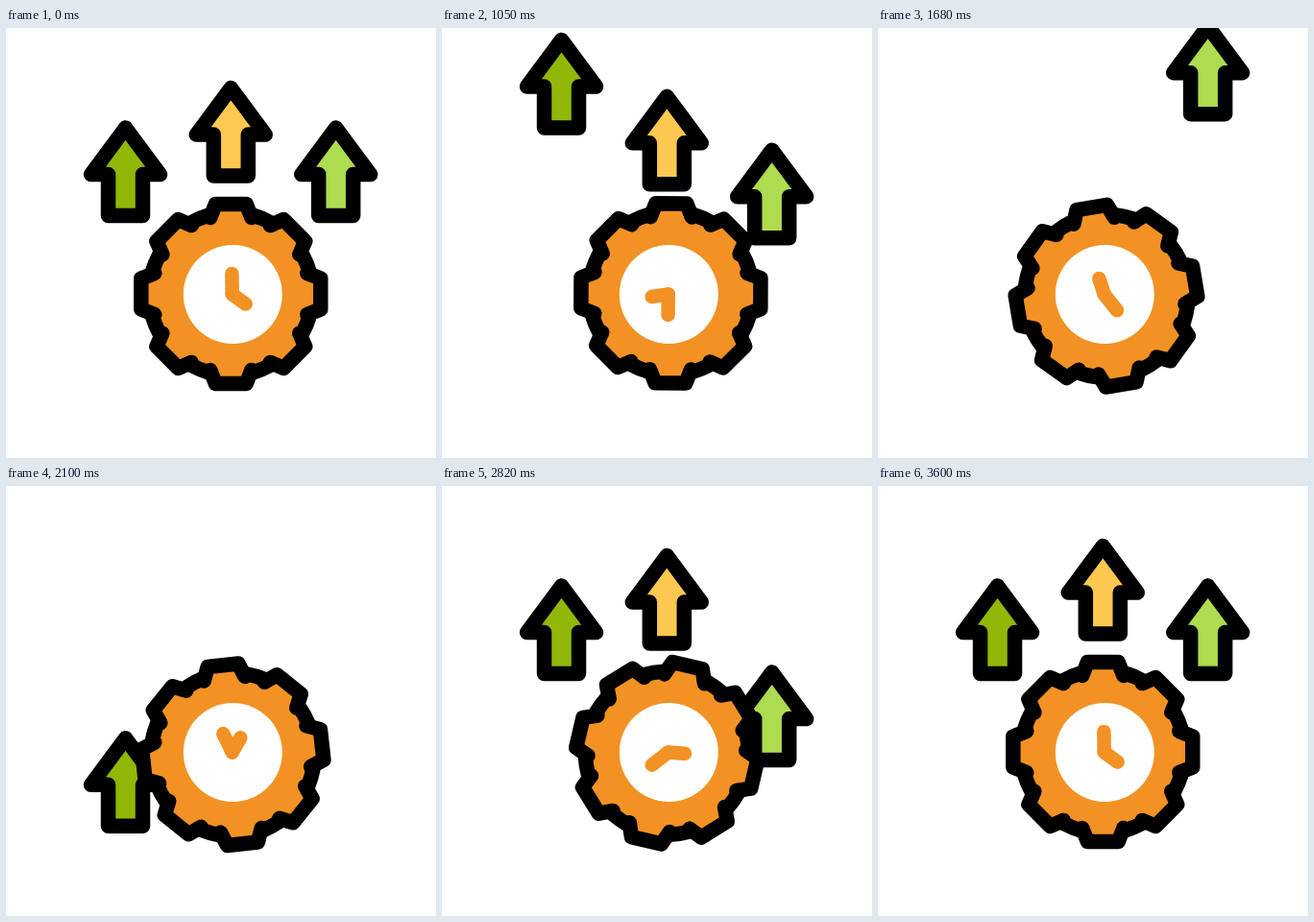
An HTML page with a canvas for the animation above (3.63 s loop, 448 by 448 pixels).

```html
<!DOCTYPE html>
<html>
<head>
<meta charset="utf-8">
<style>
  html, body { margin: 0; height: 100%; overflow: hidden; background: #fff; }
  canvas { display: block; }
</style>
</head>
<body>
<canvas id="stage" width="448" height="448"></canvas>
<script>
const ctx = document.getElementById('stage').getContext('2d');
const TAU = Math.PI * 2, STEP = 30, STEPS = 121;
const ORANGE = '#f29224';
ctx.lineCap = ctx.lineJoin = 'round';

// Each arrow dips, shoots off the top and glides back from below.
const arrows = [
  { x: 124.5, y: 152.5, color: '#91b708', delay: 0, end: 92.5, power: 2.9, gain: 0.01903 },
  { x: 234.3, y: 111, color: '#ffc850', delay: 10, end: 94, power: 3.36, gain: 0.00437 },
  { x: 343.7, y: 152.5, color: '#aedb50', delay: 20, end: 92.5, power: 2.9, gain: 0.01903 }
];

const clamp = v => Math.min(1, Math.max(0, v));
const smooth = v => v * v * (3 - 2 * v);

function arrowOffset(a, step) {
  const k = step - a.delay;
  if (k > 50) return a.gain * Math.max(0, a.end - k) ** a.power;
  return 25 * smooth(clamp(k / 18)) - 0.89 * Math.max(0, k - 20) ** 1.8;
}

// Fraction of the full turn: quick start, soft landing.
function turn(step) {
  const x = step / (STEPS - 1), r = 1 - x;
  return 3 * r * r * x * 0.4 + 3 * r * x * x * 0.97 + x ** 3;
}

function outline(path, fill) {
  ctx.fillStyle = fill;
  ctx.strokeStyle = '#000';
  ctx.lineWidth = 15.5;
  ctx.fill(path);
  ctx.stroke(path);
}

const arrowPath = new Path2D('M0-48.5L36 0H18V43H-18V0H-36Z');

const gearPath = new Path2D();
for (let i = 0; i < 8; i++) {
  const at = (x, y) => {
    const c = Math.cos(i * TAU / 8), s = Math.sin(i * TAU / 8);
    gearPath.lineTo(x * c - y * s, x * s + y * c);
  };
  at(-21.5, -79.5);
  at(-16, -93.5);
  at(16, -93.5);
  at(21.5, -79.5);
  const base = 0.29, start = i * TAU / 8 - TAU / 4;
  gearPath.arc(0, 0, 85, start + base, start + TAU / 8 - base);
}
gearPath.closePath();

function rotated(x, y, angle, draw) {
  ctx.save();
  ctx.translate(x, y);
  ctx.rotate(angle);
  draw();
  ctx.restore();
}

function hand(x, y, angle) {
  rotated(235.7, 277.4, angle, () => {
    ctx.strokeStyle = ORANGE;
    ctx.lineWidth = 14.5;
    ctx.beginPath();
    ctx.moveTo(0, 0);
    ctx.lineTo(x, y);
    ctx.stroke();
  });
}

function draw(step) {
  ctx.fillStyle = '#fff';
  ctx.fillRect(0, 0, 448, 448);
  for (const a of arrows)
    rotated(a.x, a.y + arrowOffset(a, step), 0, () => outline(arrowPath, a.color));

  const angle = turn(step) * TAU;
  rotated(236.5, 277.5, angle, () => {
    ctx.translate(-2.2, -0.5);
    outline(gearPath, ORANGE);
  });
  ctx.fillStyle = '#fff';
  ctx.beginPath();
  ctx.arc(236.3, 277.5, 51.5, 0, TAU);
  ctx.fill();
  hand(-0.3, -21.5, angle * 4);
  hand(14, 10.2, angle);
}

function frame() {
  draw(Math.floor(performance.now() / STEP) % STEPS);
  requestAnimationFrame(frame);
}
frame();
</script>
</body>
</html>
```
